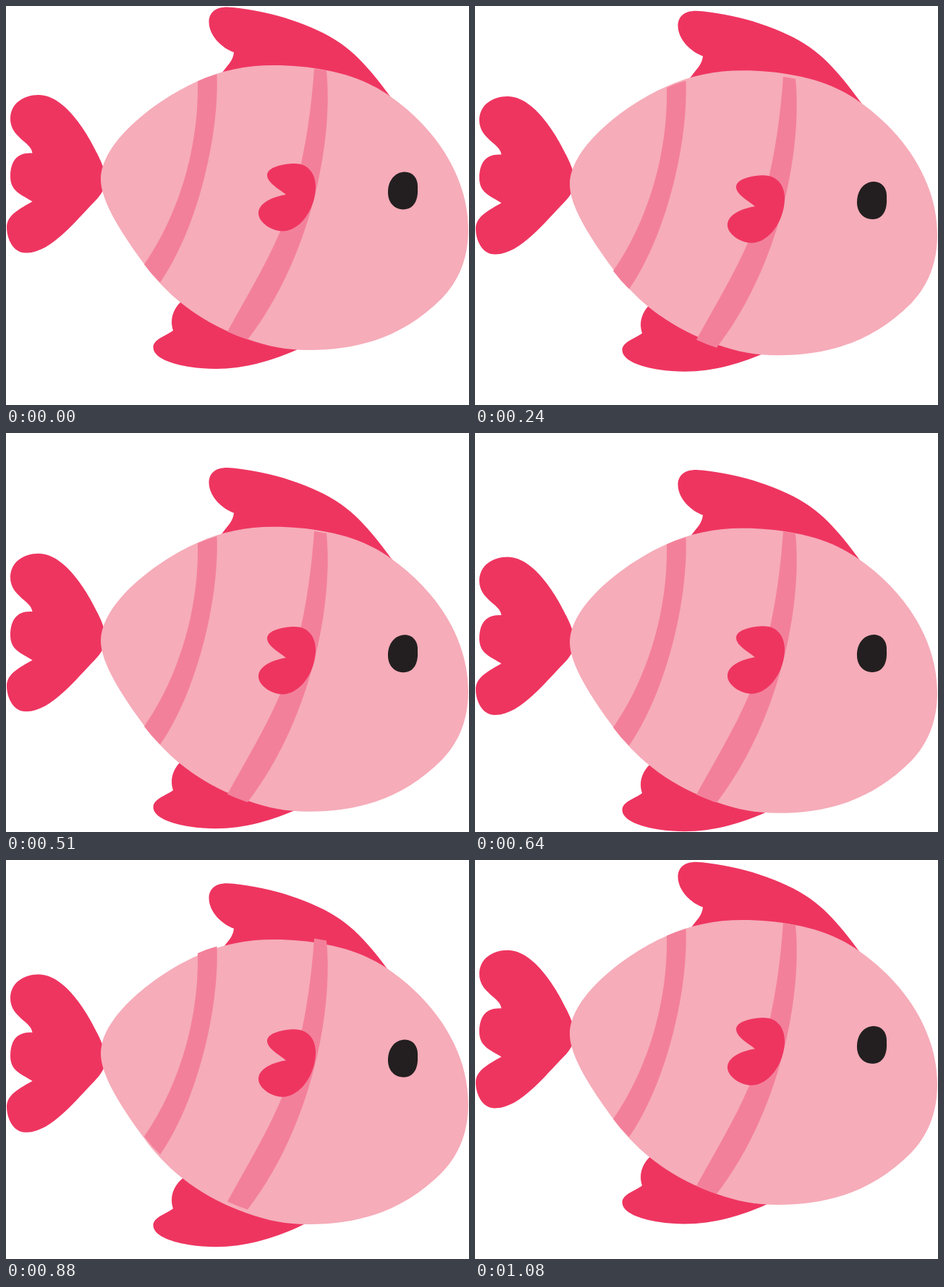
These frames come from a looping animation (640x552 px, 1.11 s). An HTML page:

```html
<!DOCTYPE html>
<html lang="en">
<head>
<meta charset="utf-8">
<title>Bobbing fish</title>
<style>
  html, body { margin: 0; width: 100%; height: 100%; overflow: hidden; background: #fff; }
  svg { display: block; width: 100vw; height: 100vh; }
  .fin { fill: #ee3560; }
  .body { fill: #f6acb9; }
  .stripe { fill: #f3809a; }
  .eye { fill: #231f20; }
</style>
</head>
<body>
<svg viewBox="0 0 640 552">
  <!-- data-lag: place in the follow-through chain -->
  <path class="fin" data-lag="7" d="M45 123C83 123 115 181 126 204C131 214 135 223 138 236C139 250 132 261 122 271C98 295 63 341 29 341.5C11 343 1 323 1 306C1 289 20 280 36.500 270.500C22 261 6 257 6 236C6 215 15 202 36.500 203.500C35 188 6 182 6 156C6 135 24 123 45 123Z"/>
  <path class="fin" data-lag="6" d="M252 400L241 410C231 420 226 434 231 449C222 456 203.500 461 203.500 472C203.500 492 251 502 290 502C330 502 370 490 402 475.500L430 462Z"/>
  <path class="fin" data-lag="5" d="M289 104L299 92C308 80 314 75 315 64C300 59 280.500 42 280.500 22C280.500 8 291 -1 314 2C368 8 424 25 463 52C489 70 512 99 531 125L538 134L550 150Z"/>
  <path class="body" data-lag="4" d="M131 240C131 188 208 129 265 104C297 89 332 82 370 82C396 82 417 84 443 89C476 95 506 107 531 125C594 169 639 236 639 310C639 350 625 381 603 404C550 457 490 476 418 476C388 476 362 471 334 461C300 449 268 432 241 410C224 396 205 377 191 357C160 315 131 270 131 240Z"/>
  <path class="stripe" data-lag="3" d="M265 104Q278 98 291.500 94.500C295 181 264 309 213 382.500Q201 371 191 357.500C241 285 267 191 265 104Z"/>
  <path class="stripe" data-lag="2" d="M426 86.500L443 89.500C453 190 420 350 334 461.500Q320 457 306 450.500C332 403 358 361 379 312C409 240 421 158 426 86.500Z"/>
  <path class="eye" data-lag="1" d="M551 229.500C563 229.500 570 239 569 252C570 267 565 281.500 549 281.500C535 281 528 270 528 258C528 242 537 230 551 229.500Z"/>
  <path class="fin" data-lag="0" d="M387 261C379 254 361 245 361 234C361 223 383 218 399 218C417 218 428 231 428 250C428 280 407 311.500 382 311.500C365 311 349 298 349 287C349 272 369 264 387 261Z"/>
</svg>
<script>
  const LOOP = 1110, STEPS = 33, DROP = 50.5, LAG = 0.0128;

  const parts = [...document.querySelectorAll('path')].map(el => ({ el, lag: el.dataset.lag * LAG }));

  // Start time of each drawn step, rounded to 10 ms.
  const starts = Array.from({ length: STEPS }, (_, k) => Math.round((34 * k - (k > 16 ? 8 : 0)) / 10) * 10);

  // cubic-bezier(.6, 0, .4, 1), solved by bisection
  function ease(x) {
    let lo = 0, hi = 1;
    for (let i = 0; i < 24; i++) {
      const s = (lo + hi) / 2, r = 1 - s;
      if (1.8 * s * r * r + 1.2 * s * s * r + s ** 3 < x) lo = s; else hi = s;
    }
    return lo * lo * (3 - 2 * lo);
  }

  // Down during the first half of the cycle, back up in the second.
  function bob(phase) {
    const u = 2 * (phase - Math.floor(phase));
    return DROP * ease(u < 1 ? u : 2 - u);
  }

  function draw(time) {
    const t = time % LOOP;
    const phase = (starts.filter(s => s <= t).length - 1) / STEPS;
    for (const { el, lag } of parts) {
      const y = bob(phase - lag) - bob(-lag);
      el.setAttribute('transform', `translate(0 ${y.toFixed(2)})`);
    }
  }

  let begin;
  function tick(now) {
    begin ??= now;
    draw(now - begin);
    requestAnimationFrame(tick);
  }
  draw(0);
  requestAnimationFrame(tick);
</script>
</body>
</html>
```
